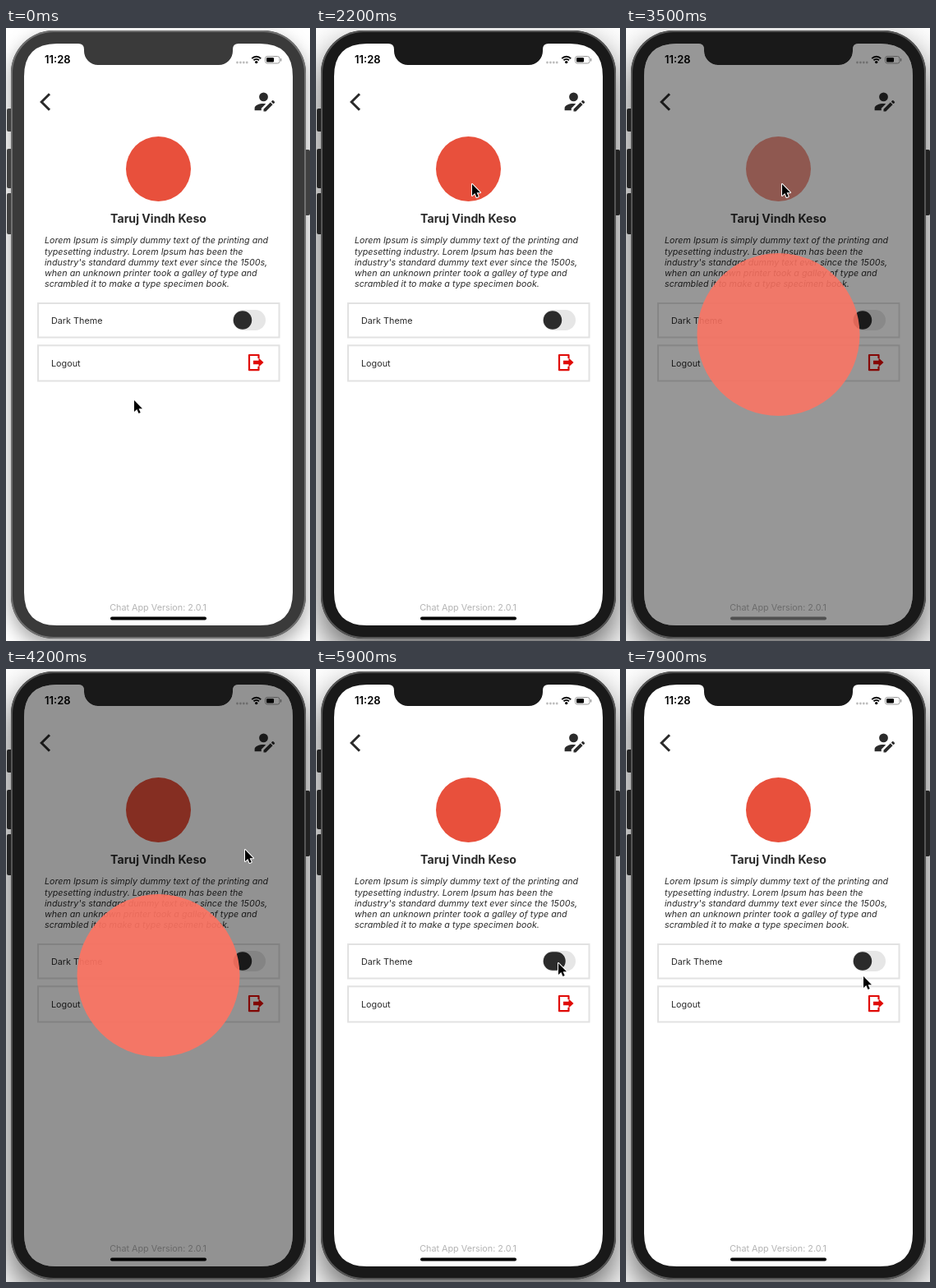
An HTML page with a canvas that plays this animation: 370x746 px, repeating every 8 s.

```html
<!DOCTYPE html>
<html lang="en">
<head>
<meta charset="utf-8">
<title>Profile screen</title>
<style>
  html, body { margin: 0; width: 100%; height: 100%; overflow: hidden; background: #fff; }
  canvas { display: block; }
</style>
</head>
<body>
<canvas id="stage" width="370" height="746"></canvas>
<script>
const ctx = document.getElementById('stage').getContext('2d');
const LOOP = 8000, STEP = 100;
const FONT = 'Inter, "Liberation Sans", sans-serif';
const LIGHT = { bg: '#fff', fg: '#2b2b2b', status: '#000', border: '#e2e2e2', track: '#e6e6e6' };
const DARK = { bg: '#2b2b2b', fg: '#fff', status: '#fff', border: '#e2e2e2', track: '#5a5a5a' };
const BIO = [
  'Lorem Ipsum is simply dummy text of the printing and',
  'typesetting industry. Lorem Ipsum has been the',
  "industry's standard dummy text ever since the 1500s,",
  'when an unknown printer took a galley of type and',
  'scrambled it to make a type specimen book.'
];

// The pointer rests between these moves.
const HOME = { x: 156, y: 453 };
const MOVES = [
  { at: 0, span: 300, x: 316, y: 85 },
  { at: 1300, span: 300, x: 199, y: 191 },
  { at: 1900, span: 300, x: 190, y: 190 },
  { at: 3500, span: 600, x: 291, y: 220 },
  { at: 4800, span: 900, x: 295, y: 358 },
  { at: 7700, span: 200, x: 289, y: 374 }
];

// Smooth rise from 0 to 1.
function ramp(t, at, span) {
  const k = Math.min(1, Math.max(0, (t - at) / span));
  return k * k * (3 - 2 * k);
}
// Rises, holds, then falls back to 0.
const pulse = (t, up, upSpan, down, downSpan) => ramp(t, up, upSpan) - ramp(t, down, downSpan);

function pointer(t) {
  let { x, y } = HOME;
  for (const move of MOVES) {
    const k = ramp(t, move.at, move.span);
    x += (move.x - x) * k;
    y += (move.y - y) * k;
  }
  return { x, y };
}

function rounded(x, y, w, h, r, fill) {
  ctx.beginPath();
  ctx.roundRect(x, y, w, h, r);
  ctx.fillStyle = fill;
  ctx.fill();
}
function disc(x, y, r, fill) {
  ctx.beginPath();
  ctx.arc(x, y, r, 0, Math.PI * 2);
  ctx.fillStyle = fill;
  ctx.fill();
}
function label(text, x, y, style, fill, align = 'left') {
  ctx.font = style + ' ' + FONT;
  ctx.textAlign = align;
  ctx.fillStyle = fill;
  ctx.fillText(text, x, y);
}
function withAlpha(alpha, draw) {
  ctx.save();
  ctx.globalAlpha *= alpha;
  draw();
  ctx.restore();
}

const screen = new Path2D(
  'M62 19H88Q95 19 95 26V28A17 17 0 0 0 112 45H259A17 17 0 0 0 276 28V26Q276 19 283 19H309' +
  'Q349 19 349 59V687Q349 727 309 727H62Q22 727 22 687V59Q22 19 62 19Z');
const shoulders = new Path2D('M302.6 100.2V97.5C302.6 94 308 92 313.5 92L316.3 92.2L310.8 97.7V100.2Z');
const arrow = new Path2D('M0 0V14L3.3 11L5.5 16L7.7 15L5.6 10.2H10Z');
const doorway = new Path2D('M307.5 402V398H296V416.2H307.5V412');
const exitArrow = new Path2D('M301 404.7H307.5V401.6L313.5 407L307.5 412.4V409.3H301Z');

function drawPhone(focused) {
  ctx.fillStyle = '#fff';
  ctx.fillRect(0, 0, 370, 746);
  const body = focused ? '#191919' : '#3a3a3a';
  const sideButton = (x, y, h) => rounded(x, y, 6.5, h, 2, focused ? '#222' : '#404040');
  ctx.save();
  ctx.shadowColor = focused ? 'rgba(0,0,0,.62)' : 'rgba(0,0,0,.36)';
  ctx.shadowBlur = focused ? 42 : 22;
  ctx.shadowOffsetY = focused ? 18 : 9;
  rounded(6, 3, 359, 740, 52, body);
  ctx.restore();
  sideButton(1, 98, 28);
  sideButton(1, 147, 48);
  sideButton(1, 201, 50);
  sideButton(363.5, 148, 80);
  rounded(6, 3, 359, 740, 52, focused ? '#555' : '#707070');
  rounded(8, 5, 355, 736, 50, body);
}

function drawStatus(c) {
  label('11:28', 47, 43, '600 13px', c.status);
  for (let i = 0; i < 4; i++) disc(281.5 + i * 3.9, 42, 1.4, '#bdbdbd');
  ctx.strokeStyle = c.status;
  ctx.lineWidth = 1.9;
  for (const r of [4.6, 7.7]) {
    ctx.beginPath();
    ctx.arc(304.7, 42.5, r, -Math.PI * .75, -Math.PI * .25);
    ctx.stroke();
  }
  disc(304.7, 41.6, 1.7, c.status);
  ctx.lineWidth = 1;
  ctx.strokeStyle = '#999';
  ctx.beginPath();
  ctx.roundRect(315.5, 34.5, 17.5, 8.5, 2.5);
  ctx.stroke();
  rounded(317, 36, 9, 5.5, 1.2, c.status);
  rounded(334, 37, 1.3, 3.6, .6, '#999');
}

function drawBack(c) {
  ctx.strokeStyle = c.fg;
  ctx.lineWidth = 3;
  ctx.beginPath();
  ctx.moveTo(53, 80.2);
  ctx.lineTo(43.2, 90);
  ctx.lineTo(53, 99.8);
  ctx.stroke();
}

function drawEdit(c) {
  disc(313.5, 83.9, 5.4, c.fg);
  ctx.fill(shoulders);
  ctx.translate(313.5, 101.6);
  ctx.rotate(-Math.PI / 4);
  ctx.beginPath();
  ctx.moveTo(0, 0);
  ctx.lineTo(2, -2);
  ctx.lineTo(2, 2);
  ctx.rect(2, -2, 11.7, 4);
  ctx.roundRect(14.9, -2, 3, 4, 1);
  ctx.fill();
}

function drawToggle(c, t) {
  rounded(276, 343, 40, 25, 12.5, c.track);
  const on = pulse(t, 5900, 400, 7200, 400);
  const stretch = pulse(t, 5700, 200, 6000, 200) + pulse(t, 7000, 200, 7300, 200);
  const width = 22.5 + 4.5 * stretch;
  rounded(276.7 + on * (38.6 - width), 344.3, width, 22.5, 11.25, c.fg);
}

function drawProfile(c, t) {
  ctx.fillStyle = c.bg;
  ctx.fillRect(22, 19, 327, 708);
  drawStatus(c);
  drawBack(c);
  withAlpha(1 - .8 * pulse(t, 700, 200, 1900, 300), () => drawEdit(c));
  withAlpha(1 - .78 * pulse(t, 3000, 200, 3300, 400), () => disc(185.5, 171.5, 39.5, '#e8503c'));

  label('Taruj Vindh Keso', 185.5, 237, '700 14.1px', c.fg, 'center');
  BIO.forEach((line, i) => label(line, 47, 262.3 + i * 13.2, 'italic 400 10.73px', c.fg));

  ctx.strokeStyle = c.border;
  ctx.lineWidth = 2;
  ctx.strokeRect(39, 335, 293.5, 41.5);
  ctx.strokeRect(39, 386.3, 293.5, 43.2);
  label('Dark Theme', 55, 360, '400 10.8px', c.fg);
  label('Logout', 55, 412, '400 10.8px', c.fg);
  drawToggle(c, t);

  ctx.strokeStyle = ctx.fillStyle = '#e00a06';
  ctx.lineWidth = 2.2;
  ctx.lineJoin = 'round';
  ctx.stroke(doorway);
  ctx.fill(exitArrow);
  label('Chat App Version: 2.0.1', 185, 709, '400 10.8px', '#b4b4b4', 'center');
}

function drawModal(t) {
  withAlpha(pulse(t, 3300, 230, 4200, 500), () => {
    ctx.fillStyle = 'rgba(0,0,0,.427)';
    ctx.fillRect(22, 19, 327, 708);
    disc(185.5, 373, 99, 'rgba(255,116,98,.9)');
  });
}

function drawPointer(t) {
  const { x, y } = pointer(t);
  ctx.save();
  ctx.translate(x, y);
  ctx.lineJoin = 'round';
  ctx.lineWidth = 2;
  ctx.strokeStyle = '#fff';
  ctx.stroke(arrow);
  ctx.fillStyle = '#000';
  ctx.fill(arrow);
  ctx.restore();
}

function render(t) {
  const colors = t >= 6100 && t < 7400 ? DARK : LIGHT;
  drawPhone(t >= 500);
  ctx.save();
  ctx.clip(screen);
  drawProfile(colors, t);
  drawModal(t);
  const dim = Math.round(80 * pulse(t, 3300, 200, 3600, 300));
  rounded(127, 716.5, 117, 4, 2, colors === DARK ? '#fff' : `rgb(${dim},${dim},${dim})`);
  ctx.restore();
  drawPointer(t);
}

const start = performance.now();
function tick() {
  const t = (performance.now() - start) % LOOP;
  render(Math.floor(t / STEP) * STEP);
  requestAnimationFrame(tick);
}
tick();
</script>
</body>
</html>
```
